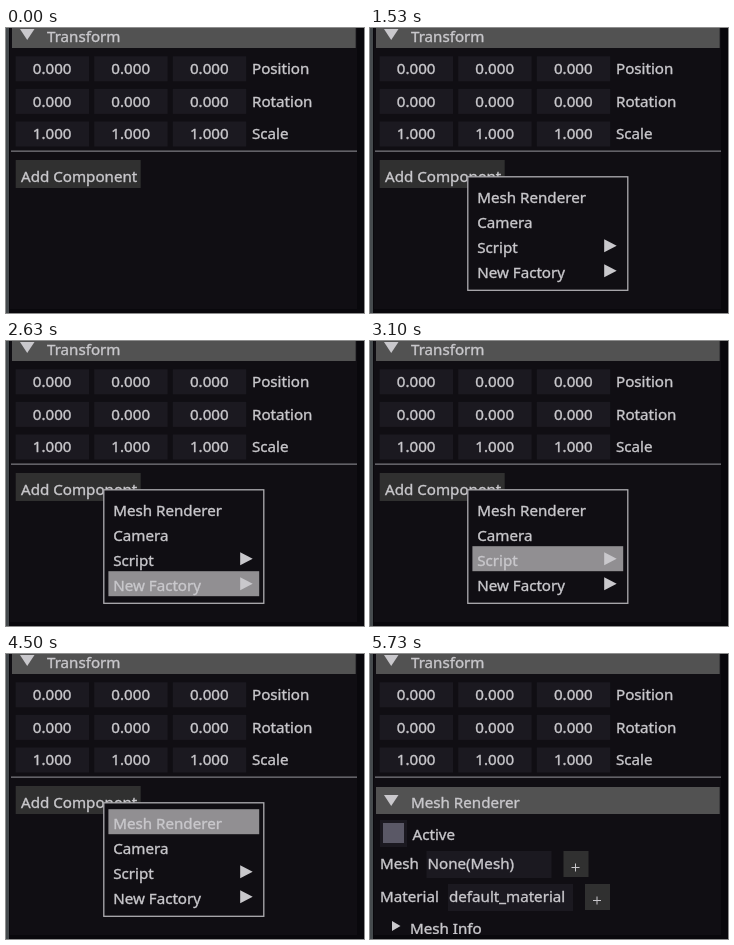
An HTML page with a canvas that plays this animation: 358x285 px, repeating every 6890 ms.

```html
<!DOCTYPE html>
<html lang="en">
<head>
<meta charset="utf-8">
<title>Add Component menu</title>
<style>
html, body { margin: 0; width: 100%; height: 100%; overflow: hidden; background: #100e13; }
canvas { display: block; }
</style>
</head>
<body>
<canvas id="stage" width="358" height="285"></canvas>
<script>
const ctx = document.getElementById('stage').getContext('2d');
const LOOP = 6890;
const INK = '#c9c8cc', FIELD = '#1b1920', HEADER = '#525252', BUTTON = '#303030',
      HOVER = '#545260', ACTIVE = '#918f92', POPUP = '#100e13', BORDER = '#aeadb1';

const MAIN = ['Mesh Renderer', 'Camera', 'Script>', 'New Factory>'];
const SCRIPTS = ['Tank_Turret', 'Tank_Shoot', 'Tank_Movement'];

// Each step holds until the next one; row is the lit row of the main menu.
const STEPS = [
  { at: 0 },
  { at: 1150, button: HOVER },
  { at: 1460, button: ACTIVE },
  { at: 1530, row: -1 },
  { at: 2080, row: 0 },
  { at: 2310, row: 1 },
  { at: 2460, row: 2, sub: 'language' },
  { at: 2630, row: 3 },
  { at: 2700, row: 3, sub: 'factory' },
  { at: 3100, row: 2 },
  { at: 3170, row: 2, sub: 'language' },
  { at: 3490, row: 2, sub: 'scripts', script: -1 },
  { at: 3960, row: 2, sub: 'scripts', script: 0 },
  { at: 4270, row: 1 },
  { at: 4500, row: 0 },
  { at: 4960, row: 1 },
  { at: 5420, row: 0 },
  { at: 5730, added: true }
];

function box(x, y, w, h, color) {
  ctx.fillStyle = color;
  ctx.fillRect(x, y, w, h);
}

// A thin outline gives the letters their medium weight.
function text(str, x, y, align = 'left') {
  ctx.fillStyle = ctx.strokeStyle = INK;
  ctx.textAlign = align;
  ctx.lineWidth = .35;
  ctx.fillText(str, x, y);
  ctx.strokeText(str, x, y);
}

function triangle(...p) {
  ctx.fillStyle = INK;
  ctx.beginPath();
  ctx.moveTo(p[0], p[1]);
  ctx.lineTo(p[2], p[3]);
  ctx.lineTo(p[4], p[5]);
  ctx.fill();
}

function header(label, y) {
  box(6, y, 343.7, 27, HEADER);
  triangle(14, y + 8, 28.5, y + 8, 21.2, y + 19);
  text(label, 41, y + 21);
}

// x, y, w and the height follow the middle of the border line.
function popup(x, y, w, items, lit, color = ACTIVE, rows = items.length) {
  const h = rows * 25 + 13.5;
  box(x, y, w, h, POPUP);
  ctx.strokeStyle = BORDER;
  ctx.lineWidth = 1.3;
  ctx.strokeRect(x, y, w, h);
  items.forEach((item, i) => {
    const top = y + 6.4 + i * 25;
    if (i === lit) box(x + 4.6, top, w - 9.2, 25, color);
    text(item.replace('>', ''), x + 9.4, top + 20);
    if (item.endsWith('>')) {
      const a = x + w - 23.6;
      triangle(a, top + 6, a + 12.5, top + 12.5, a, top + 19);
    }
  });
}

function transform() {
  header('Transform', -7);
  ['Position', 'Rotation', 'Scale'].forEach((label, r) => {
    const y = 28.3 + r * 32.6;
    for (let c = 0; c < 3; c++) {
      const x = 9.6 + c * 78.6;
      box(x, y, 73.4, 25, FIELD);
      text(r === 2 ? '1.000' : '0.000', x + 36.5, y + 17.8, 'center');
    }
    text(label, 246, y + 17.8);
  });
  box(5, 122.5, 346, 1.3, '#77767c');
}

function slot(label, value, x, y) {
  text(label, 10, y + 18);
  box(x, y, 125, 27, FIELD);
  text(value, x + 1, y + 18);
  box(x + 137, y, 25, 26, BUTTON);
  box(x + 145, y + 16, 8, 1, INK);
  box(x + 148.5, y + 12.5, 1, 8, INK);
}

function meshRenderer() {
  header('Mesh Renderer', 133);
  box(10, 166, 27, 27, FIELD);
  box(13, 169, 21, 20, '#5a5866');
  text('Active', 42.5, 186);
  slot('Mesh', 'None(Mesh)', 56.5, 197);
  slot('Material', 'default_material', 78, 230);
  triangle(22, 267, 30.5, 272, 22, 277);
  text('Mesh Info', 40, 280);
}

function menus(s) {
  popup(97.8, 148.8, 160, MAIN, s.row);
  if (s.sub === 'factory') {
    popup(-60, 223.8, 166.4, [], -1, ACTIVE, 2);
    box(-55, 230, 157, 25, FIELD);
  } else if (s.sub) {
    popup(249.4, 198.8, 70, ['C#>'], s.sub === 'scripts' ? 0 : -1, s.script === 0 ? HEADER : ACTIVE);
    if (s.sub === 'scripts') popup(89.3, 198.8, 168.5, SCRIPTS, s.script);
  }
}

function draw(s) {
  box(0, 0, 358, 285, '#09080c');
  box(4, 0, 347, 281, '#100e13');
  ctx.font = '15.15px "Noto Sans", "Open Sans", sans-serif';
  ctx.save();
  ctx.beginPath();
  ctx.rect(4, 0, 347, 280);
  ctx.clip();
  transform();
  if (s.added) meshRenderer();
  else {
    box(9.7, 132, 125, 28, s.button || BUTTON);
    text('Add Component', 15, 153.6);
  }
  ctx.restore();
  box(0, 0, 3, 285, '#454a4d');
  if (s.row !== undefined) menus(s);
}

function frame() {
  const t = performance.now() % LOOP;
  draw(STEPS.findLast(s => s.at <= t));
  requestAnimationFrame(frame);
}
frame();
</script>
</body>
</html>
```
